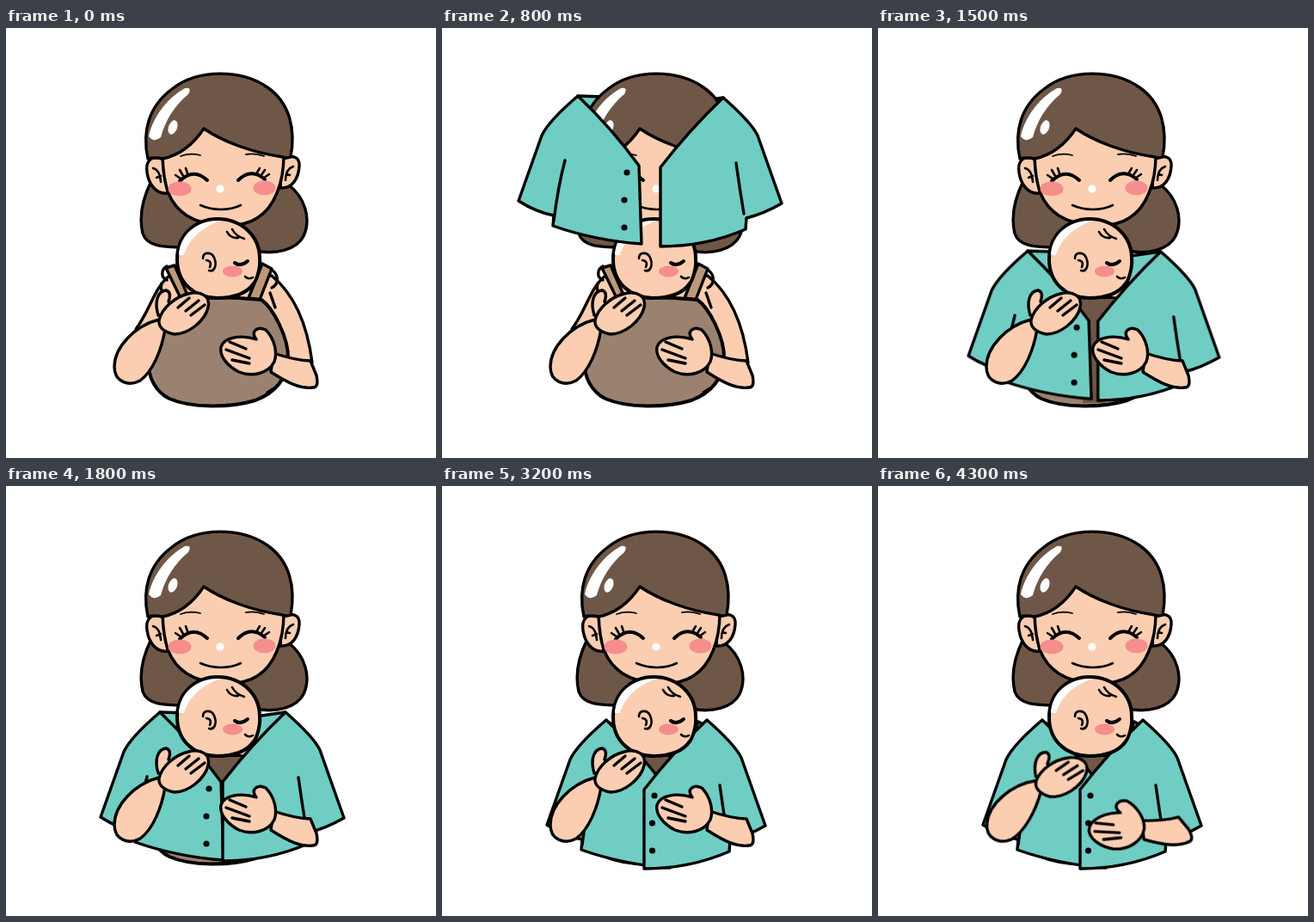
These frames come from a looping animation (500 by 500 pixels, 4.8 s). An HTML page:

```html
<!DOCTYPE html>
<html lang="en">
<head>
<meta charset="utf-8">
<title>Mother dressing with baby</title>
<style>
  html, body { margin: 0; width: 100%; height: 100%; overflow: hidden; background: #fff; }
  svg { display: block; width: 100%; height: 100%; }
  .ink { stroke: #000; stroke-width: 3.4; stroke-linecap: round; stroke-linejoin: round; }
  .bold { stroke-width: 4; }
  .fine { stroke-width: 2.6; }
  .line { fill: none; }
  .skin { fill: #fbceb1; }
  .hair { fill: #6f5748; }
  .cloth { fill: #70cdc4; }
  .carrier { fill: #9b8270; }
  .strap { fill: #bd9878; }
  .blush { fill: #f58e8d; }
  .white { fill: #fff; }

  .falling, .worn, .collar, .left, .right, .arm, .button {
    animation-duration: 4.8s;
    animation-iteration-count: infinite;
  }
  .falling { animation-name: fall, whileFalling; }
  .worn { animation-name: whileWorn; }
  .collar { animation-name: fall, whileOpen; }
  .left { animation-name: closeLeft; }
  .right { animation-name: closeRight; }
  .arm { animation-name: pat; }
  .arm.near { --turn: 5.7deg; transform-origin: 145px 400px; }
  .arm.far { --turn: -17.3deg; transform-origin: 345px 401px; }
  .button { animation-timing-function: step-end; }
  .b1 { animation-name: button1; }
  .b2 { animation-name: button2; }
  .b3 { animation-name: button3; }

  @keyframes fall {
    0%, 12.5% { transform: translate(-16px, -348px); animation-timing-function: steps(4); }
    20.83%, 100% { transform: none; }
  }
  @keyframes whileFalling {
    0%, 20.83%, 100% { opacity: 0; animation-timing-function: step-end; }
    12.5% { opacity: 1; animation-timing-function: step-end; }
  }
  @keyframes whileWorn {
    0% { opacity: 0; animation-timing-function: step-end; }
    20.83%, 100% { opacity: 1; }
  }
  @keyframes whileOpen {
    0%, 45.83%, 100% { opacity: 0; animation-timing-function: step-end; }
    12.5% { opacity: 1; animation-timing-function: step-end; }
  }
  @keyframes closeLeft {
    0%, 20.83% { transform: none; animation-timing-function: steps(8); }
    37.5% { transform: translate(13px, 10px); animation-timing-function: steps(4); }
    45.83% { transform: translate(21px, 16px); animation-timing-function: steps(3); }
    52.08%, 100% { transform: translate(25px, 19px); }
  }
  @keyframes closeRight {
    0%, 20.83% { transform: none; animation-timing-function: steps(8); }
    37.5% { transform: translate(-10px, 8px); animation-timing-function: steps(4); }
    45.83% { transform: translate(-19px, 14px); animation-timing-function: steps(3); }
    52.08%, 100% { transform: translate(-27px, 17px); }
  }
  @keyframes pat {
    0%, 75% { transform: none; animation-timing-function: steps(7); }
    89.58%, 100% { transform: rotate(var(--turn)); }
  }
  @keyframes button1 { 0% { opacity: 0; } 62.5%, 100% { opacity: 1; } }
  @keyframes button2 { 0% { opacity: 0; } 64.58%, 100% { opacity: 1; } }
  @keyframes button3 { 0% { opacity: 0; } 66.66%, 100% { opacity: 1; } }
</style>
</head>
<body>
<svg viewBox="0 0 500 500">
  <defs>
    <g id="leftPanel">
      <path class="ink cloth" d="M166 253Q132 282 124 299L97 375Q117 388 138 392L137 404Q185 421 240 425L237 334Q205 290 166 253Z"/>
      <path class="ink line" d="M151 328Q143 358 138 398"/>
      <g><circle cx="223" cy="342" r="3.6"/><circle cx="220" cy="374" r="3.6"/><circle cx="220" cy="406" r="3.6"/></g>
    </g>
    <g id="rightPanel">
      <path class="ink cloth" d="M335 255Q368 284 375 299L403 378Q382 390 362 395L361 408Q315 428 262 428L262 336Q296 292 335 255Z"/>
      <path class="ink line" d="M350 331Q354 360 359 390"/>
    </g>
  </defs>

  <!-- shoulders and carrier -->
  <g class="ink">
    <path class="skin" d="M190 288C172 302 167 330 151 350L180 375L210 330L290 330L325 392L356 389C351 350 338 312 309 288Z"/>
    <path class="line" d="M187 277C180 281 180 290 187 293M181 297Q178 306 186 309M309 281C318 288 317 298 309 302M307 308L313 325"/>
    <path class="strap" d="M186 279L196 276L210 308L203 314Z"/>
    <path class="strap" d="M298 274L309 280L295 316L282 314Z"/>
    <path class="carrier bold" d="M206 315Q250 311 297 316C310 325 329 360 328 385C326 412 308 426 290 433C260 442 215 442 190 431C175 424 164 405 167 390C170 365 186 326 206 315Z"/>
    <path class="line" d="M304 424L310 420"/>
  </g>

  <g class="collar ink">
    <path class="cloth left" d="M166 253L198 254L211 280L206 296Z"/>
    <path class="cloth right" d="M335 255L300 260L292 282L300 297Z"/>
  </g>

  <!-- head -->
  <g class="ink">
    <path class="hair" d="M169 178C158 200 155 222 159 239C164 254 183 255 207 255L290 259C313 264 338 258 346 242C355 222 348 197 328 182Z"/>
    <path class="skin" d="M184 153C168 146 162 156 164 168C166 182 175 194 188 192Z"/>
    <path class="skin" d="M321 153C333 146 342 150 341 161C340 175 333 187 319 186Z"/>
    <path class="line fine" d="M171 163Q179 165 180 179M175 174L180 172M334 161Q325 164 325 177M330 171L326 170"/>
    <path class="skin" d="M182 148C183 187 191 205 210 218C232 232 272 234 292 221C312 209 323 180 323 148L230 110Z"/>
    <path class="hair" d="M165 152C158 120 166 91 193 71C223 47 274 48 304 69C330 87 337 118 331 150Q326 152 322 150C286 145 252 132 230 117C218 135 202 148 182 152Q173 150 165 152Z"/>
    <path class="line bold" d="M202 178Q218 162 234 177M270 177Q285 162 301 176"/>
    <path class="line fine" d="M203 175L197 171M206 172L202 165M211 169L209 163M300 174L306 170M297 171L301 165M292 168L295 163"/>
    <path class="line" stroke-width="2" style="stroke-width:1.8" d="M203 149Q214 145 226 148M279 147Q290 145 300 149"/>
    <path class="line fine" d="M226 206Q237 211 250 211Q263 211 273 206"/>
  </g>
  <g class="white">
    <path d="M166 126C170 106 186 82 208 70Q217 68 212 77C196 90 185 108 180 127Q172 134 166 126Z"/>
    <ellipse cx="194" cy="115.500" rx="5" ry="8.5" transform="rotate(20 194 115.500)"/>
    <circle cx="249" cy="187" r="4.6"/>
  </g>
  <ellipse class="blush" cx="202" cy="187" rx="13.5" ry="8.5"/>
  <ellipse class="blush" cx="300.500" cy="186" rx="13" ry="8.5"/>

  <g class="worn">
    <path class="hair" d="M234 315L276 315L264 340V436H238V340Z"/>
    <use class="left" href="#leftPanel"/>
    <use class="right" href="#rightPanel"/>
    <circle class="button b1" cx="247" cy="360" r="3.6"/>
    <circle class="button b2" cx="244.500" cy="392" r="3.6"/>
    <circle class="button b3" cx="244.500" cy="424" r="3.6"/>
  </g>

  <!-- baby -->
  <path class="ink bold skin" d="M199 269C199 241 220 222 246 222C274 222 295 242 295 268C296 278 292 292 288 297C279 310 262 314 245 314C218 313 199 296 199 269Z"/>
  <path class="white" d="M201 264C202 240 222 223 250 224C228 231 212 246 207 264Z"/>
  <ellipse class="blush" cx="263.500" cy="283" rx="11.5" ry="6.5"/>
  <g class="ink line fine">
    <path d="M229 268C229 260 239 260 242 267C246 276 242 284 236 282M233 270Q240 271 237 278"/>
    <path d="M278 289Q282 293 287 290M257 237Q261 245 270 244M263 234Q267 242 277 245"/>
    <path class="bold" d="M266 273Q273 278 281 271"/>
  </g>

  <g class="arm near ink">
    <path class="skin" d="M178 339C150 346 126 371 126 394C126 412 143 417 156 410C171 399 181 374 185 350Z"/>
    <path class="skin" d="M177 334C172 317 177 306 186 305Q193 307 189 318L198 335Z"/>
    <path class="skin" d="M178 340C181 326 196 313 212 309C228 305 238 313 235 325C231 341 212 356 196 356C184 354 177 348 178 340Z"/>
    <path class="line" d="M200 325L213 314M209 329L224 317M215 334L231 322"/>
  </g>
  <g class="arm far ink">
    <path class="skin" d="M311 378C326 383 342 387 354 387L361 404Q364 418 357 418C343 420 328 413 308 400Z"/>
    <path class="skin" d="M250 371C253 360 272 356 291 362C284 353 292 346 302 351C312 361 316 377 312 388C305 402 286 406 271 400C257 393 248 381 250 371Z"/>
    <path class="line" d="M260 365L279 373M256 374L283 384M263 386L283 390"/>
  </g>

  <g class="falling">
    <use href="#leftPanel"/>
    <use href="#rightPanel"/>
  </g>
</svg>
</body>
</html>
```
